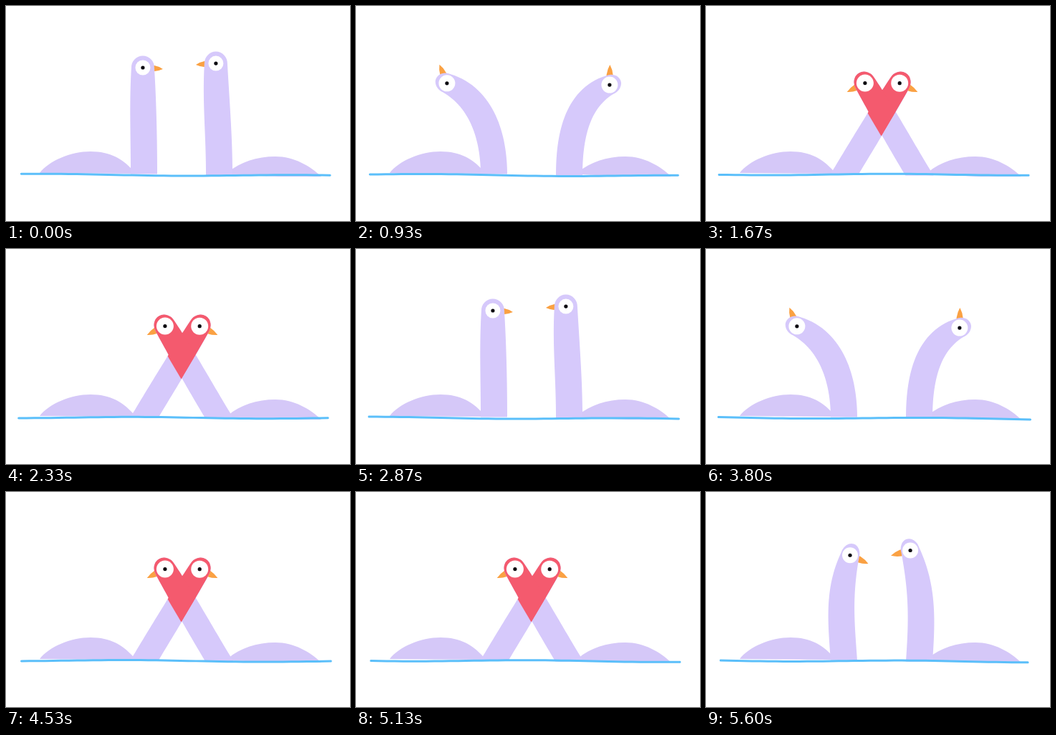
These frames come from a looping animation (480 px wide and 300 px high, 5670 ms). An HTML page with a canvas:

```html
<!DOCTYPE html>
<html lang="en">
<head>
<meta charset="utf-8">
<title>Two swans</title>
<style>
  html, body { margin: 0; width: 100%; height: 100%; overflow: hidden; background: #fff; }
  canvas { display: block; width: 480px; height: 300px; }
</style>
</head>
<body>
<canvas id="stage" width="480" height="300"></canvas>
<script>
const ctx = document.getElementById('stage').getContext('2d');
const LOOP = 5670, CYCLE = 43, STRETCH = 70;
const LILAC = '#d6c9fb', BODY = '#d5c8f8', RED = '#f45a6e', ORANGE = '#faa143', BLUE = '#5bbffa';
const birds = [{ side: 0, x: 192.5, dir: 1, floor: 234.5 }, { side: 1, x: 297.5, dir: -1, floor: 236.5 }];

// Angles are in degrees from upright, positive towards the other bird.
// turn and reach place the eye around the root; pairs are [left, right].
const poses = {
  up:    { turn: [-0.6, 1.7], reach: [150, 156], root: 0, tilt: 0, beak: [94, 94], neck: 18.5, head: 16, eye: 10.5 },
  lean:  { turn: [-27.1, -24.1], reach: [144, 138], root: 0, tilt: -67, beak: [-22, -1], neck: 18.5, head: 13.7, eye: 11.5 },
  cross: { turn: [31.2, 30.5], reach: [150, 149], root: 31, tilt: 31, beak: [116, 116], neck: 16.8, head: 15, eye: 12 },
  near:  { turn: [3.3, 4.6], reach: [148, 155], root: -4, tilt: 18, beak: [115, 105], neck: 18.5, head: 13, eye: 11 }
};
const keys = [[0, 'up'], [10, 'up'], [14, 'lean'], [18, 'lean'], [23, 'cross'], [38, 'cross'], [41, 'near'], [CYCLE, 'up']];

const rad = deg => deg * Math.PI / 180;
const mix = (a, b, u) => a + (b - a) * u;

function poseAt(bird, step) {
  let i = 0;
  while (step >= keys[i + 1][0]) i++;
  const [a, from] = keys[i], [b, to] = keys[i + 1];
  const u = (step - a) / (b - a), e = u * u * (3 - 2 * u);
  const get = (name, field) => [poses[name][field]].flat()[poses[name][field].length ? bird.side : 0];
  const p = {};
  for (const field in poses.up) p[field] = mix(get(from, field), get(to, field), e);
  // Necks shoot up while swinging from the lean into the heart
  if (from === 'lean' && to === 'cross') p.reach += STRETCH * Math.sin(Math.PI * u);

  const move = ([x, y], deg, d) => [x + bird.dir * Math.sin(rad(deg)) * d, y - Math.cos(rad(deg)) * d];
  const root = [bird.x, 236], eye = move(root, p.turn, p.reach), handle = 0.37 * p.reach;
  p.curve = [root, move(root, p.root, handle), move(eye, p.tilt, -handle), eye];
  [p.x, p.y] = eye;
  p.beakDir = Math.PI / 2 * -1 + bird.dir * rad(p.beak);
  p.headDir = Math.PI / 2 * -1 + bird.dir * rad(p.tilt);
  p.floor = bird.floor;
  return p;
}

function bezier([a, b, c, d], t) {
  const s = 1 - t;
  const at = k => s * s * s * a[k] + 3 * s * s * t * b[k] + 3 * s * t * t * c[k] + t * t * t * d[k];
  const slope = k => s * s * (b[k] - a[k]) + 2 * s * t * (c[k] - b[k]) + t * t * (d[k] - c[k]);
  return { x: at(0), y: at(1), dir: Math.atan2(slope(1), slope(0)) };
}

function drawNeck(p, color) {
  const N = 32, far = [];
  ctx.save();
  ctx.beginPath();
  ctx.rect(0, 0, 480, p.floor);
  ctx.clip();
  ctx.beginPath();
  for (let i = -3; i <= N; i++) {
    const t = i / N, c = bezier(p.curve, t), w = mix(p.neck, p.head, t ** 4);
    const nx = -Math.sin(c.dir) * w, ny = Math.cos(c.dir) * w;
    ctx.lineTo(c.x - nx, c.y - ny);
    far.unshift([c.x + nx, c.y + ny]);
  }
  ctx.ellipse(p.x, p.y, 16.5, p.head, p.headDir, -Math.PI / 2, Math.PI / 2);
  far.forEach(q => ctx.lineTo(...q));
  ctx.fillStyle = color;
  ctx.fill();
  ctx.restore();
}

function drawBeak(p) {
  ctx.save();
  ctx.translate(p.x, p.y);
  ctx.rotate(p.beakDir);
  ctx.beginPath();
  ctx.moveTo(9, -4.5);
  ctx.lineTo(14, -4.5);
  ctx.quadraticCurveTo(22, -3.5, 28, 0);
  ctx.quadraticCurveTo(22, 3.5, 14, 4.5);
  ctx.lineTo(9, 4.5);
  ctx.fillStyle = ORANGE;
  ctx.fill();
  ctx.restore();
}

function dot(x, y, r, color) {
  ctx.beginPath();
  ctx.arc(x, y, r, 0, 7);
  ctx.fillStyle = color;
  ctx.fill();
}

function drawEye(p) {
  dot(p.x, p.y, p.eye, '#fff');
  dot(p.x, p.y, 2.6, '#0c0a10');
}

const bodies = new Path2D(
  'M47 233C60 216 90 203 118 203C146 203 163 214 176 228L180 234Z' +
  'M310 232C326 218 350 210 376 210C402 210 424 223 440 238L380 238L312 235Z');

// The heart is the part of both necks above their crossing
function drawHeart(pair) {
  ctx.save();
  ctx.beginPath();
  ctx.moveTo(244.5, 181.5);
  ctx.lineTo(184.5, 80);
  ctx.lineTo(304.5, 80);
  ctx.clip();
  pair.forEach(p => drawNeck(p, RED));
  ctx.restore();
}

const rand = n => { const v = Math.sin(n * 127.1 + 3.7) * 43758.5453; return v - Math.floor(v); };

function drawWater(step) {
  const r = i => rand(step * 7 + i);
  const x0 = 22 - 5 * r(0), x1 = 460 + 6 * r(1);
  ctx.beginPath();
  for (let u = 0; u <= 1; u += 1 / 40) {
    ctx.lineTo(mix(x0, x1, u), 235 + 2.5 * r(2) * u + Math.sin(u * 8 + 6.3 * r(3)));
  }
  ctx.strokeStyle = BLUE;
  ctx.lineWidth = 3;
  ctx.lineCap = ctx.lineJoin = 'round';
  ctx.stroke();
}

function draw(step) {
  const s = step % CYCLE;
  const pair = birds.map(bird => poseAt(bird, s));
  ctx.fillStyle = '#fff';
  ctx.fillRect(0, 0, 480, 300);
  ctx.fillStyle = BODY;
  ctx.fill(bodies);
  pair.forEach(drawBeak);
  pair.forEach(p => drawNeck(p, LILAC));
  if (s >= 23 && s <= 38) drawHeart(pair);
  pair.forEach(drawEye);
  drawWater(step);
}

// Fifteen drawings a second, held for 70, 60 and 70 ms
function stepAt(t) {
  const r = t % 200;
  return Math.floor(t / 200) * 3 + (r < 70 ? 0 : r < 130 ? 1 : 2);
}

const start = performance.now();
function tick() {
  draw(stepAt((performance.now() - start) % LOOP));
  requestAnimationFrame(tick);
}
tick();
</script>
</body>
</html>
```
